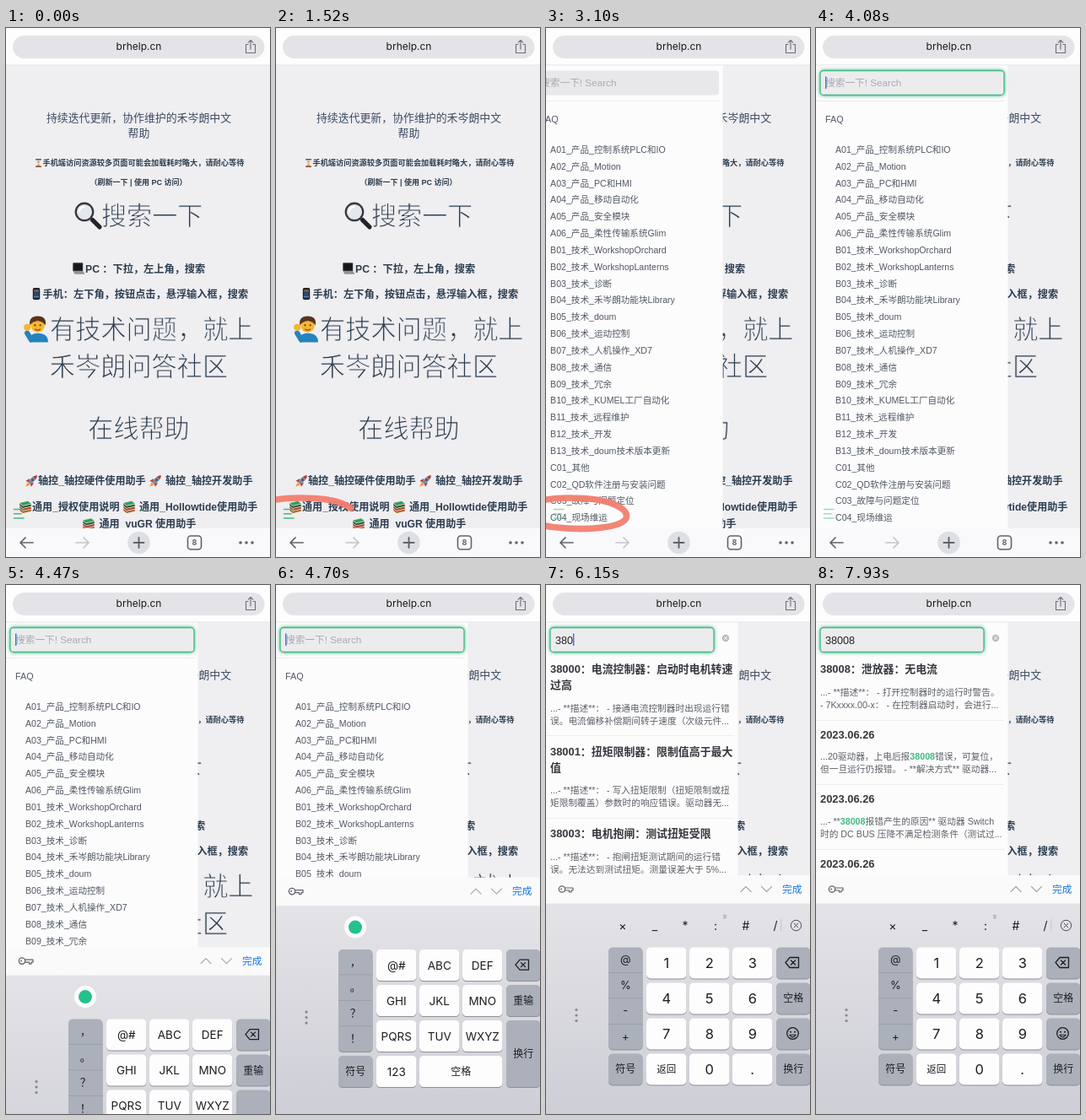
An HTML page for the animation above (8 s loop, 313 by 627 pixels).

```html
<!DOCTYPE html>
<html lang="zh-CN">
<head>
<meta charset="utf-8">
<style>
html, body { margin: 0; width: 100%; height: 100%; overflow: hidden; background: #efeef1; }
svg { display: block; width: 313px; height: 627px; }
text { font-family: "Liberation Sans", "Noto Sans CJK SC", "Noto Sans CJK", sans-serif; white-space: pre; }
.ui text, text.ui { font-family: Inter, "Noto Sans CJK SC", "Noto Sans CJK", sans-serif; }
.line { fill: none; stroke-linecap: round; stroke-linejoin: round; }
/* A page-coloured outline thins the strokes of the large headings. */
.thin { stroke: #efeef1; stroke-width: 0.9; }
.focus { fill: #ececef; stroke: #42b983; stroke-width: 1.3; filter: drop-shadow(0 0 2px #42b983); }
</style>
</head>
<body>
<svg id="stage" viewBox="0 0 313 627"></svg>
<script>
const LOOP = 8000;
const INK = '#2c3e50';
const GREEN = '#42b983';

// Text is placed by the vertical centre of its line.
const text = (x, y, s, size, fill = INK, extra = '') =>
  `<text x="${x}" y="${y + size * 0.37}" font-size="${size}" fill="${fill}" ${extra}>${s}</text>`;
const MID = 'text-anchor="middle" ';
const BOLD = 'font-weight="700" ';
const THIN = 'class="thin" ';
const rect = (x, y, w, h, fill, r = 0, extra = '') =>
  `<rect x="${x}" y="${y}" width="${w}" height="${h}" rx="${r}" fill="${fill}" ${extra}/>`;
const circle = (x, y, r, fill, extra = '') => `<circle cx="${x}" cy="${y}" r="${r}" fill="${fill}" ${extra}/>`;
const line = (d, stroke, width = 1, extra = '') =>
  `<path class="line" d="${d}" stroke="${stroke}" stroke-width="${width}" ${extra}/>`;
const shape = (d, fill) => `<path d="${d}" fill="${fill}"/>`;

// Pictographs live in a 20 x 20 box around their centre.
const pictographs = {
  lens: line('M3.5 3.5L9 9', '#242427', 3.4) + circle(-2.6, -2.6, 6.6, '#e3e8ec', 'stroke="#39393d" stroke-width="1.5"') +
    line('M-6.5 -3Q-6 -6 -3 -6.5', '#fff', 1.4),
  hourglass: shape('M-5 -8H5Q5 -3 1 0Q5 3 5 8H-5Q-5 3 -1 0Q-5 -3 -5 -8', '#d5dadf') +
    shape('M-4 -4H4L0 1L4 8H-4L0 1Z', '#d9a05a') + rect(-7, -10, 14, 3, '#8a4b32', 1) + rect(-7, 7, 14, 3, '#8a4b32', 1),
  laptop: rect(-9, -9, 16, 13, '#303238', 1) + rect(-7.5, -7.5, 13, 10, '#15171b') + shape('M-9 4H7L10 9H-6Z', '#8e9299'),
  phone: rect(-6, -10, 12, 20, '#17181c', 2.5) + rect(-4.5, -8, 9, 16, '#33475f', 1) +
    [-3, 0, 3].map((x, i) => circle(x, -5, 1, ['#e35d4f', '#f2c14b', '#58b96b'][i]) + circle(x, 5, 1, '#69b7e8')).join(''),
  person: shape('M-5 10Q-6 3 1 3Q9 3 9 10Z', '#2583bd') + line('M-4 8L-7 3', '#2583bd', 4) + circle(-7, -1.5, 2.6, '#f6b62c') +
    circle(1, -3, 5.4, '#f6b62c') + shape('M-5 -3Q-6 -10 1 -10Q8 -10 7 -3Q5 -6 1 -6.5Q-3 -6 -5 -3', '#59341f') +
    circle(-1, -3, 0.7, '#4b3320') + circle(3, -3, 0.7, '#4b3320') + line('M-1 0Q1 1.5 3 0', '#8a4a1f', 0.8),
  rocket: shape('M-6 2L-9 9L-2 6Z', '#f39a2d') + shape('M-3 -4L-9 0L-3 2ZM4 3L0 9L-2 3Z', '#c8322f') +
    shape('M9 -9Q0 -8 -5 2L-2 5Q8 0 9 -9', '#7f8a98') + shape('M9 -9Q5 -9 3 -7L7 -3Q9 -5 9 -9', '#c8322f') + circle(2, -2, 2, '#2d5f98'),
  books: shape('M-9 -6L4 -9L9 -5L-4 -2Z', '#3d9b58') + shape('M-9 -5L-4 -1L9 -4V-1L-4 2L-9 -2Z', '#235c36') +
    shape('M-9 -1L-4 3L9 0V3L-4 6L-9 2Z', '#b83c30') + shape('M-9 3L-4 7L9 4V7L-4 10L-9 6Z', '#a56c22')
};
const picto = (name, x, y, size) => `<g transform="translate(${x} ${y}) scale(${size / 20})">${pictographs[name]}</g>`;

const page = [
  text(157.5, 106, '持续迭代更新，协作维护的禾岑朗中文', 12.9, '#3b4c60', MID),
  text(157.5, 124.5, '帮助', 12.9, '#3b4c60', MID),
  picto('hourglass', 38.5, 160, 10),
  text(43.5, 160, '手机端访问资源较多页面可能会加载耗时略大，请耐心等待', 9.2, INK, BOLD),
  text(157, 183, '（刷新一下 | 使用 PC 访问）', 9, INK, BOLD + MID),
  picto('lens', 97, 222, 31),
  text(113, 222, '搜索一下', 30.1, INK, THIN),
  picto('laptop', 86, 285, 15),
  text(94, 285, 'PC ：下拉，左上角，搜索', 12.2, INK, BOLD),
  picto('phone', 36, 315, 14),
  text(43.5, 315, '手机：左下角，按钮点击，悬浮输入框，搜索', 12.2, INK, BOLD),
  picto('person', 36, 357, 31),
  text(52, 357, '有技术问题，就上', 30.2, INK, THIN),
  text(157.5, 400.5, '禾岑朗问答社区', 30.2, INK, MID + THIN),
  text(157.5, 474, '在线帮助', 30.1, INK, MID + THIN),
  ...[
    ['rocket', 23, 537, '轴控_轴控硬件使用助手'], ['rocket', 170, 537, '轴控_轴控开发助手', 189],
    ['books', 16, 567.5, '通用_授权使用说明'], ['books', 139, 567.5, '通用_Hollowtide使用助手', 158],
    ['books', 91, 588, '通用_vuGR 使用助手', 110.5]
  ].map(([icon, x, y, label, tx = x + 15]) => picto(icon, x + 7, y, 15) + text(tx, y, label, 12.1, INK, BOLD))
].join('');

const menu = [
  'A01_产品_控制系统PLC和IO', 'A02_产品_Motion', 'A03_产品_PC和HMI', 'A04_产品_移动自动化', 'A05_产品_安全模块',
  'A06_产品_柔性传输系统Glim', 'B01_技术_WorkshopOrchard', 'B02_技术_WorkshopLanterns', 'B03_技术_诊断',
  'B04_技术_禾岑朗功能块Library', 'B05_技术_doum', 'B06_技术_运动控制', 'B07_技术_人机操作_XD7', 'B08_技术_通信',
  'B09_技术_冗余', 'B10_技术_KUMEL工厂自动化', 'B11_技术_远程维护', 'B12_技术_开发', 'B13_技术_doum技术版本更新',
  'C01_其他', 'C02_QD软件注册与安装问题', 'C03_故障与问题定位', 'C04_现场维运'
].map((item, i) => text(23, 144 + i * 19.83, item, 10.6, '#505762')).join('');

const title = (y, s) => text(5, y, s, 12.9, '#34373c', BOLD);
const detail = (y, ...rows) => rows.map((s, i) => text(5, y + i * 15, s, 10.7, '#5c6066')).join('');
const divider = y => rect(0, y, 223, 1, '#ececee');
const hit = `<tspan fill="${GREEN}" font-weight="700">38008</tspan>`;

const broadResults =
  title(99, '38000：电流控制器：启动时电机转速') + title(118, '过高') +
  detail(146, '...- **描述**： - 接通电流控制器时出现运行错', '误。电流偏移补偿期间转子速度（次级元件...') + divider(178) +
  title(197, '38001：扭矩限制器：限制值高于最大') + title(216, '值') +
  detail(243.5, '...- **描述**： - 写入扭矩限制（扭矩限制或扭', '矩限制覆盖）参数时的响应错误。驱动器无...') + divider(276) +
  title(294.5, '38003：电机抱闸：测试扭矩受限') +
  detail(322, '...- **描述**： - 抱闸扭矩测试期间的运行错', '误。无法达到测试扭矩。测量误差大于 5%...');

const exactResults =
  title(99, '38008：泄放器：无电流') +
  detail(127, '...- **描述**： - 打开控制器时的运行时警告。', '- 7Kxxxx.00-x： - 在控制器启动时，会进行...') + divider(160) +
  title(177, '2023.06.26') +
  detail(203.5, `...20驱动器，上电后报${hit}错误，可复位，`, '但一旦运行仍报错。 - **解决方式** 驱动器...') + divider(236) +
  title(253.5, '2023.06.26') +
  detail(280, `...- **${hit}报错产生的原因** 驱动器 Switch`, '时的 DC BUS 压降不满足检测条件（测试过...') + divider(313) +
  title(330, '2023.06.26');

const sidebar = rect(0, 44, 227.5, 583, '#fcfcfd') +
  `<g id="menu">${divider(86)}${text(11, 108.5, 'FAQ', 10.8, '#505762')}${menu}</g>` +
  `<g id="broad">${broadResults}</g><g id="exact">${exactResults}</g>` +
  rect(5, 50.5, 218, 29, '#e8e8eb', 4, 'id="field"') +
  text(11, 65, '搜索一下! Search', 11.7, '#a9abaf', 'id="hint"') +
  text(11, 65, '', 12.6, '#222', 'id="query"') +
  rect(11, 57.5, 1.4, 14.5, '#3f6fd8', 0, 'id="caret"') +
  `<g id="clear">${circle(213, 63, 4.2, '#b9bbc0')}${line('M211.5 61.5l3 3m0 -3l-3 3', '#fff', 1)}</g>`;

const burger = line('M9.5 570.5H21M9.5 575.7H18M9.5 581H21', GREEN, 1.5, 'id="burger"');

const GREY = '#5f6368';
const header = `<g class="ui">${rect(0, 0, 313, 44, '#fdfdfe')}${rect(0, 43.5, 313, 0.8, '#e2e2e5')}${rect(8, 9, 298.5, 27, '#e4e4e8', 13.5)}` +
  text(157.5, 22, 'brhelp.cn', 12, '#17181a', MID) +
  line('M287 19.5H284.5V29.5H295.5V19.5H293M290 25V14.5M287.2 17.2L290 14.5L292.8 17.2', '#6c6f75', 1.1) + '</g>';

const toolbar = `<g class="ui">${rect(0, 593, 313, 34, '#f9f9fb')}` +
  line('M32 610H17M23 604L17 610L23 616', GREY, 1.7) + line('M83 610H98M92 604L98 610L92 616', '#c3c5c9', 1.7) +
  circle(157.5, 610, 13.3, '#dddfe5') + line('M151.5 610H163.5M157.5 604V616', GREY, 1.9) +
  rect(215.5, 602, 16, 16, 'none', 3.5, `stroke="${GREY}" stroke-width="1.6"`) + text(223.5, 610, '8', 9, GREY, MID + BOLD) +
  [278, 285, 292].map(x => circle(x, 610, 1.8, GREY)).join('') + '</g>';

const loopMark = line('M-24 571C-14 556 20 556 45 557.5C75 559 96 569 95.5 579C94.5 592 50 596.5 8 591.5C-12 589 -27 582 -24 571',
  '#f37f6f', 7.6, 'id="mark" pathLength="100" stroke-dasharray="100 100"');

// Keyboard: five columns, four rows.
const columns = [74, 119, 170, 221, 273];
const SHADE = '#abb0ba';
function key(col, row, label, size = 16, rows = 1, cols = 1) {
  const side = col === 0 || col === 4, x = columns[col], y = 429.5 + row * 42;
  const w = cols > 1 ? columns[col + cols - 1] + 47.5 - x : side ? 40.5 : 47.5, h = rows * 42 - 5;
  return rect(x, y + 1, w, h, '#8d9097', 5) + rect(x, y, w, h, side ? SHADE : '#fdfdfe', 5, `class="key" data-key="${label}"`) +
    text(x + w / 2, y + h / 2, label, size, '#1c1d20', MID);
}
const symbolColumn = symbols => key(0, 0, '', 12, 3) + [...symbols].map((s, i) =>
  text(94.3, 443.5 + i * 30.5, s, 13, '#1c1d20', MID) + (i ? rect(74, 428.5 + i * 30.5, 40.5, 0.7, '#9298a2') : '')).join('');
const grid = (labels, size) => labels.map((s, i) => key(1 + i % 3, Math.floor(i / 3), s, size)).join('');
const backspace = key(4, 0, '') + line('M289 441.5H299.5V453.5H289L284 447.5ZM290.5 445l5 5m0 -5l-5 5', '#1c1d20', 1.3);

const letters = circle(94, 403, 13, '#fdfdfe') + circle(94, 403, 8, '#24c18c') +
  symbolColumn('，。？！') + grid(['@#', 'ABC', 'DEF', 'GHI', 'JKL', 'MNO', 'PQRS', 'TUV', 'WXYZ'], 13.5) +
  backspace + key(4, 1, '重输', 12) + key(4, 2, '换行', 12, 2) +
  key(0, 3, '符号', 12) + key(1, 3, '123', 13.5) + key(2, 3, '空格', 12, 1, 2);

const digits = [['×', 91], ['_', 129], ['*', 165], [':', 201], ['#', 237], ['/', 272]].map(([s, x]) => text(x, 404, s, 14, '#1c1d20', MID)).join('') +
  text(212, 393, '半', 5, '#777', MID) + rect(278.5, 396, 0.7, 15, '#b9bac0') +
  circle(296.5, 403.5, 6.2, 'none', 'stroke="#4a4c52"') + line('M294.2 401.2l4.6 4.6m0 -4.6l-4.6 4.6', '#4a4c52', 1) +
  symbolColumn('@%-+') + grid([...'123456789'], 16.5) + backspace + key(4, 1, '空格', 12) + key(4, 2, '') +
  circle(292.5, 531.5, 6.8, 'none', 'stroke="#1c1d20" stroke-width="1.3"') + circle(290, 529.7, 1, '#1c1d20') + circle(295, 529.7, 1, '#1c1d20') +
  line('M288.8 533.2Q292.5 538.5 296.2 533.2Z', '#1c1d20', 1.1) +
  key(4, 3, '换行', 12) + key(0, 3, '符号', 12) + key(1, 3, '返回', 11.5) + key(2, 3, '0', 16.5) + key(3, 3, '.', 16.5);

const keyboard = `<g id="keyboard" class="ui">${rect(0, 377, 313, 250, 'url(#tray)')}${rect(0, 344, 313, 33.5, '#fafafb')}` +
  circle(19, 360.5, 3.7, 'none', `stroke="${GREY}" stroke-width="1.3"`) + circle(18, 360.5, 1, GREY) +
  line('M22.5 359H32V362H30V364H27.5V362H22.5', GREY, 1.2) +
  line('M231 363.5L237 357.5L243 363.5M255.5 357.5L261.5 363.5L267.5 357.5', '#a7a9ae', 1.2) + text(280, 360.5, '完成', 11.7, '#1777e6') +
  [503.5, 510, 516.5].map(y => circle(36, y, 1.6, '#85878d')).join('') +
  `<g id="letters">${letters}</g><g id="digits">${digits}</g></g>`;

document.getElementById('stage').innerHTML =
  '<defs><linearGradient id="tray" x2="0" y2="1"><stop stop-color="#e4e3e7"/><stop offset="1" stop-color="#cdced6"/></linearGradient></defs>' +
  rect(0, 0, 313, 627, '#efeef1') + page + `<g id="sidebar">${sidebar}</g>` + burger + header + toolbar + loopMark + keyboard;

const el = id => document.getElementById(id);
const show = (id, on) => { el(id).style.display = on ? '' : 'none'; };
const progress = (t, start, length) => Math.min(1, Math.max(0, (t - start) / length));
const easeOut = (p, power) => 1 - (1 - p) ** power;

const FOCUS = 3980, DIGITS = 5110;
const strokes = [[5500, '3'], [5720, '8'], [5950, '0'], [6350, '0'], [7180, '8']];
const keys = [...document.querySelectorAll('.key')].map(node => ({ node, label: node.dataset.key, fill: node.getAttribute('fill') }));

function draw(t) {
  const typed = strokes.filter(([at]) => at <= t);
  const query = typed.map(([, s]) => s).join('');
  const [lastAt, lastKey] = typed.at(-1) || [4420, ''];
  const focused = t >= FOCUS, narrow = t >= 7360;

  const open = easeOut(progress(t, 2885, 300), 2);
  el('sidebar').setAttribute('transform', `translate(${-228 * (1 - open)} 0)`);
  el('burger').style.opacity = 1 - open * 0.5;

  const drawn = progress(t, 1030, 1100);
  show('mark', drawn > 0 && t < 3810);
  el('mark').setAttribute('stroke-dashoffset', 100 * (1 - drawn));
  el('mark').style.opacity = 0.95 * (1 - progress(t, 3560, 250));

  el('field').setAttribute('class', focused ? 'focus' : '');
  el('field').setAttribute('width', query ? 194 : 218);
  el('query').textContent = query;
  show('hint', !query);
  show('clear', query);
  show('menu', !query);
  show('broad', query && !narrow);
  show('exact', query && narrow);

  const idle = t - lastAt;
  const phase = idle < 0 ? 0 : idle % 1000;
  show('caret', focused);
  el('caret').setAttribute('x', 11 + 7 * query.length);
  el('caret').style.opacity = 1 - progress(phase, 480, 100);

  const raised = easeOut(progress(t, 4306, 500), 3);
  show('keyboard', raised > 0);
  el('keyboard').setAttribute('transform', `translate(0 ${283 * (1 - raised)})`);
  show('letters', t < DIGITS);
  show('digits', t >= DIGITS);
  const held = idle >= 0 && idle < 100 ? lastKey : '';
  for (const { node, label, fill } of keys) node.setAttribute('fill', held && label === held ? SHADE : fill);
}

function tick() {
  draw(performance.now() % LOOP);
  requestAnimationFrame(tick);
}
tick();
</script>
</body>
</html>
```
